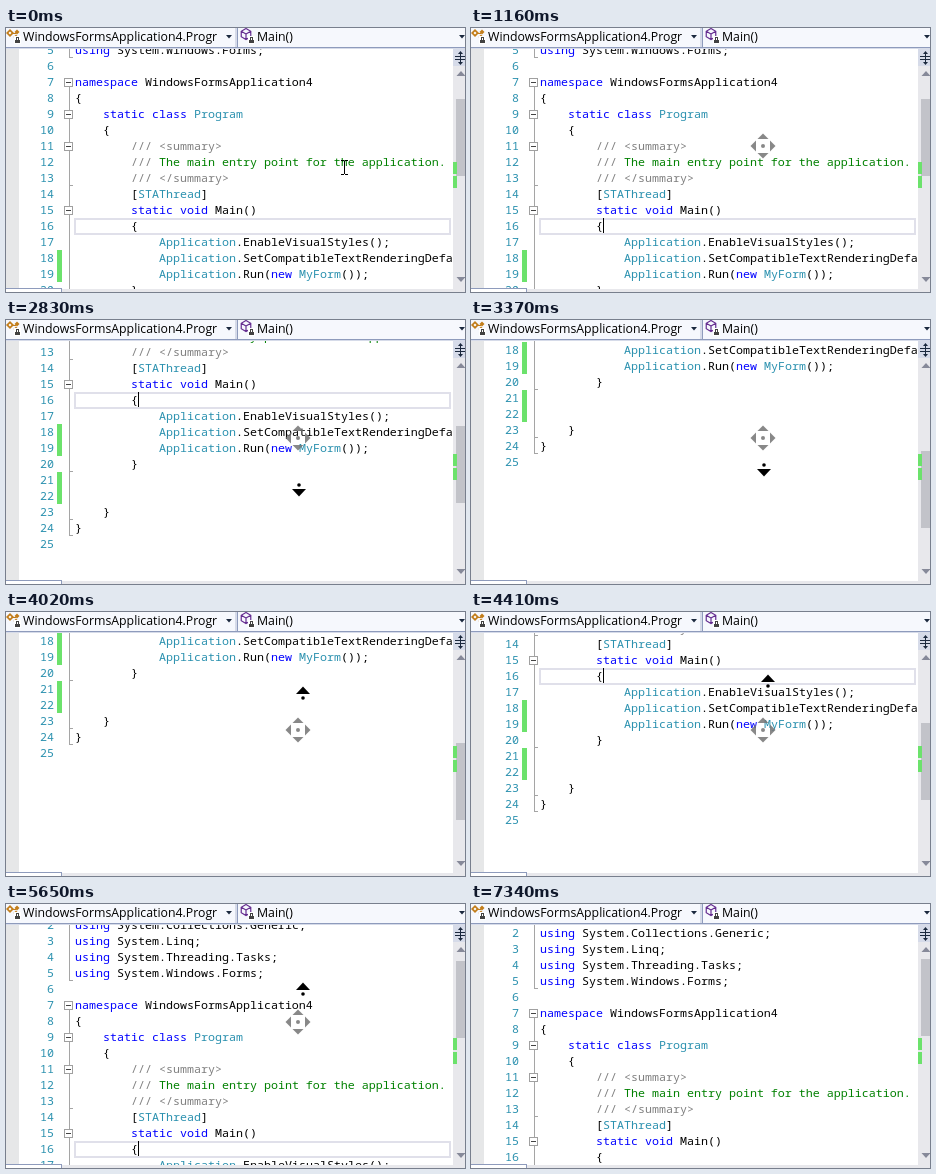
These frames come from a looping animation (459x264 px, 7.4 s). An HTML page with a canvas:

```html
<!DOCTYPE html>
<html>
<head>
<meta charset="utf-8">
<style>
html, body { margin: 0; width: 100%; height: 100%; overflow: hidden; background: #fff; }
canvas { display: block; }
</style>
</head>
<body>
<canvas id="stage" width="459" height="264"></canvas>
<script>
const ctx = document.getElementById('stage').getContext('2d');
const LOOP = 7400, ROW = 16, CHAR = 7, TEXT_X = 69, TEXT_RIGHT = 447, TOP = 21, BOTTOM = 261;
const SCROLL_START = 1720, STEP_MS = 134.5, LAST_STEP = 31, TURN_STEP = 16;
const TEAL = '#2b91af', GREEN = '#6ce26c', INK = '#1b293e', ORIGIN = { x: 292, y: 118 };

const code = `using System;
using System.Collections.Generic;
using System.Linq;
using System.Threading.Tasks;
using System.Windows.Forms;

namespace WindowsFormsApplication4
{
    static class Program
    {
        /// <summary>
        /// The main entry point for the application.
        /// </summary>
        [STAThread]
        static void Main()
        {
            Application.EnableVisualStyles();
            Application.SetCompatibleTextRenderingDefault(false);
            Application.Run(new MyForm());
        }


    }
}
`.split('\n');

const KEYWORD = /^(using|namespace|static|class|void|new)$/;
const TYPE = /^(Program|STAThread|Application|MyForm)$/;

// [refresh step, height of the row above line 1], joined by a smooth curve
const scrollKeys = [[-1, -58], [3, -72], [8, -176], [12, -258], [TURN_STEP, -271],
  [20, -192], [24, -78], [LAST_STEP, -3]];

const clamp = (v, min, max) => Math.min(max, Math.max(min, v));

function slope(i) {
  const before = scrollKeys[i - 1], after = scrollKeys[i + 1];
  return before && after ? (after[1] - before[1]) / (after[0] - before[0]) : 0;
}

function scrollAt(step) {
  const i = Math.max(1, scrollKeys.findIndex(key => step <= key[0]));
  const [s0, a] = scrollKeys[i - 1], [s1, b] = scrollKeys[i];
  const span = s1 - s0, u = (step - s0) / span, v = 1 - u;
  return Math.round(a + (b - a) * u * u * (3 - 2 * u)
    + span * u * v * (slope(i - 1) * v - slope(i) * u));
}

const swing = (step, from, to) => Math.sin(Math.PI * clamp((step - from) / (to - from), 0, 1));

const pointerOffset = step => step < TURN_STEP
  ? 9.5 + 38 * swing(step, .2, 14.1)
  : -16 - 32 * swing(step, 14.2, LAST_STEP);

function rect(color, x, y, w, h) {
  ctx.fillStyle = color;
  ctx.fillRect(x, y, w, h);
}

function frame(color, x, y, w, h, line = 1) {
  ctx.strokeStyle = color;
  ctx.lineWidth = line;
  ctx.strokeRect(x + line / 2, y + line / 2, w - line, h - line);
}

function shape(color, ...points) {
  ctx.fillStyle = color;
  ctx.beginPath();
  points.forEach(([x, y]) => ctx.lineTo(x, y));
  ctx.fill();
}

function dot(color, x, y, r) {
  ctx.fillStyle = color;
  ctx.beginPath();
  ctx.arc(x, y, r, 0, 7);
  ctx.fill();
}

// Triangle with its base centred on x, y and its tip dy away
const arrow = (color, x, y, half, dy) => shape(color, [x - half, y], [x + half, y], [x, y + dy]);

const diamond = (color, x, y, r) => shape(color, [x - r, y], [x, y - r], [x + r, y], [x, y + r]);

function clipped(y, draw) {
  ctx.save();
  ctx.beginPath();
  ctx.rect(0, y, TEXT_RIGHT, BOTTOM - y);
  ctx.clip();
  draw();
  ctx.restore();
}

function codeLine(line, y) {
  const comment = line.includes('///');
  const parts = comment ? line.split(/(\/\/\/ (?:<.*)?)/) : line.split(/(\w+)/);
  let x = TEXT_X;
  for (const part of parts) {
    ctx.fillStyle = comment ? (part.startsWith('///') ? '#808080' : '#008000')
      : KEYWORD.test(part) ? '#0000ff' : TYPE.test(part) ? TEAL : '#000';
    ctx.fillText(part, x, y);
    x += part.length * CHAR;
  }
}

function outline(rowY) {
  const color = '#a5a5a5', x = 63, bottom = n => rowY(n) + 7;
  for (const [first, last] of [[1, 5], [7, 24]])
    rect(color, x, rowY(first), 1, bottom(last) - rowY(first));
  for (const n of [5, 13, 20, 23, 24]) rect(color, x, bottom(n), 4, 1);
  for (const n of [1, 7, 9, 11, 15]) {
    const y = rowY(n);
    rect('#fff', 58, y - 4, 9, 9);
    frame('#a0a0a0', 58, y - 4, 9, 9);
    rect('#444', 60, y, 5, 1);
  }
}

function editor(scroll, caret, lineBox) {
  const rowY = n => scroll + n * ROW;
  rect('#fff', 0, 20, TEXT_RIGHT, 241);
  rect('#e6e7e8', 0, 20, 13, 241);
  for (const n of [18, 19, 21, 22]) rect(GREEN, 51, rowY(n) - 8, 5, ROW);
  outline(rowY);
  if (lineBox) frame('#e0e0ea', 68, rowY(16) - 8, TEXT_RIGHT - 70, 17, 2);

  ctx.font = '11.667px "Noto Sans Mono", monospace';
  code.forEach((line, i) => {
    const y = rowY(i + 1) + 4;
    ctx.textAlign = 'right';
    ctx.fillStyle = TEAL;
    ctx.fillText(i + 1, 48, y);
    ctx.textAlign = 'left';
    codeLine(line, y);
  });
  if (caret) rect('#000', 132, rowY(16) - 8, 1, 15);
}

function originMark() {
  const color = 'rgba(115,115,115,.85)', { x, y } = ORIGIN;
  for (const side of [-1, 1]) {
    arrow(color, x, y + side * 7, 5.5, side * 5.5);
    shape(color, [x + side * 7, y - 5.5], [x + side * 7, y + 5.5], [x + side * 12.5, y]);
  }
  dot(color, x, y, 2);
}

function scrollPointer(step) {
  const offset = pointerOffset(step), side = Math.sign(offset);
  const x = side > 0 ? 293 : 297, y = Math.round(ORIGIN.y + offset);
  dot('#000', x, y, 1.8);
  arrow('#000', x, y + side * 4, 7, side * 7.5);
}

function textPointer(t) {
  const moved = clamp(Math.floor((t - 440) / 150), 0, 3) / 3;
  const x = Math.round(338 - 44 * moved), y = Math.round(139 - 20 * moved);
  rect('#000', x, y - 6, 1, 13);
  for (const end of [-7, 7]) {
    rect('#000', x - 3, y + end, 3, 1);
    rect('#000', x + 1, y + end, 3, 1);
  }
}

function lock(x, y) {
  rect('#fff', x - 1, y - 4, 7, 8);
  frame('#424242', x + 1, y - 3, 3, 4);
  rect('#424242', x, y, 5, 3);
}

function classIcon() {
  const gold = '#c27d1a';
  diamond(gold, 4, 5, 4);
  diamond('#fff', 4, 5, 1.5);
  rect(gold, 7, 5, 3, 1);
  diamond(gold, 11, 4, 2.5);
  diamond(gold, 10, 9, 2.5);
  lock(9, 12);
}

function methodIcon() {
  const x = 240, y = 6, r = 5.5;
  ctx.strokeStyle = '#652d90';
  ctx.lineWidth = 1.2;
  ctx.beginPath();
  for (let i = 0; i < 6; i++) {
    const angle = Math.PI * (i / 3 + 1 / 6);
    ctx.lineTo(x + r * Math.cos(angle), y + r * Math.sin(angle));
  }
  ctx.closePath();
  for (const angle of [-5, -1, 3]) {
    ctx.moveTo(x, y);
    ctx.lineTo(x + r * Math.cos(angle * Math.PI / 6), y + r * Math.sin(angle * Math.PI / 6));
  }
  ctx.stroke();
  lock(243, 12);
}

function header() {
  rect('#f6f8fd', 0, 0, 459, 19);
  rect('#8e9bbc', 0, 19, 459, 1);
  rect('#d6dbe9', 0, 20, 459, 1);
  rect('#d6dbe9', 229, 0, 2, 19);
  rect('#8e9bbc', 231, 0, 1, 19);
  classIcon();
  methodIcon();
  ctx.font = '12.3px "Open Sans", sans-serif';
  ctx.fillStyle = '#000';
  ctx.fillText('WindowsFormsApplication4.Progr', 17, 13);
  ctx.fillText('Main()', 251, 13);
  for (const x of [223, 456]) arrow(INK, x, 7, 3, 3.5);
}

function scrollBars(scroll) {
  rect('#e8e8ec', TEXT_RIGHT, 20, 12, 241);
  rect('#d6dbe9', TEXT_RIGHT, 20, 12, 18);
  for (const side of [-1, 1]) {
    rect(INK, 449, 29.5 + side * 1.5, 10, 1);
    arrow(INK, 454.5, 30 + side * 4, 2.5, side * 3);
  }
  rect(INK, 454, 25, 1, 10);
  arrow('#868999', 455, 48, 4.5, -5);
  arrow('#868999', 455, 249, 4.5, 5);
  rect('#c2c3c9', 450, Math.round(54 - scroll * .298), 9, 77);
  for (const y of [134, 148]) rect(GREEN, 447, y, 4, 12);

  rect('#e8e8ec', 0, 261, 459, 3);
  rect('#fff', 0, 261, 55, 3);
  rect('#8e9bbc', 0, 260, 56, 1);
  rect('#8e9bbc', 55, 260, 1, 4);
}

function draw(t) {
  const current = clamp(Math.floor((t - SCROLL_START) / STEP_MS), -1, LAST_STEP);
  const caret = t >= 1160 && t < 6630 || t >= 7190 && t < 7340;
  const page = step => {
    editor(scrollAt(step), caret, t < 6190);
    if (t < 1160) textPointer(t);
    else if (step < LAST_STEP) originMark();
    if (step >= 0 && step < LAST_STEP) scrollPointer(step);
  };
  clipped(TOP, () => page(current));
  // The lower part of the page repaints late on the last scroll step
  if (current === LAST_STEP && t < 6070) clipped(121, () => page(LAST_STEP - 1));
  scrollBars(scrollAt(current));
  header();
}

function play(now) {
  draw(now % LOOP);
  requestAnimationFrame(play);
}
requestAnimationFrame(play);
</script>
</body>
</html>
```
